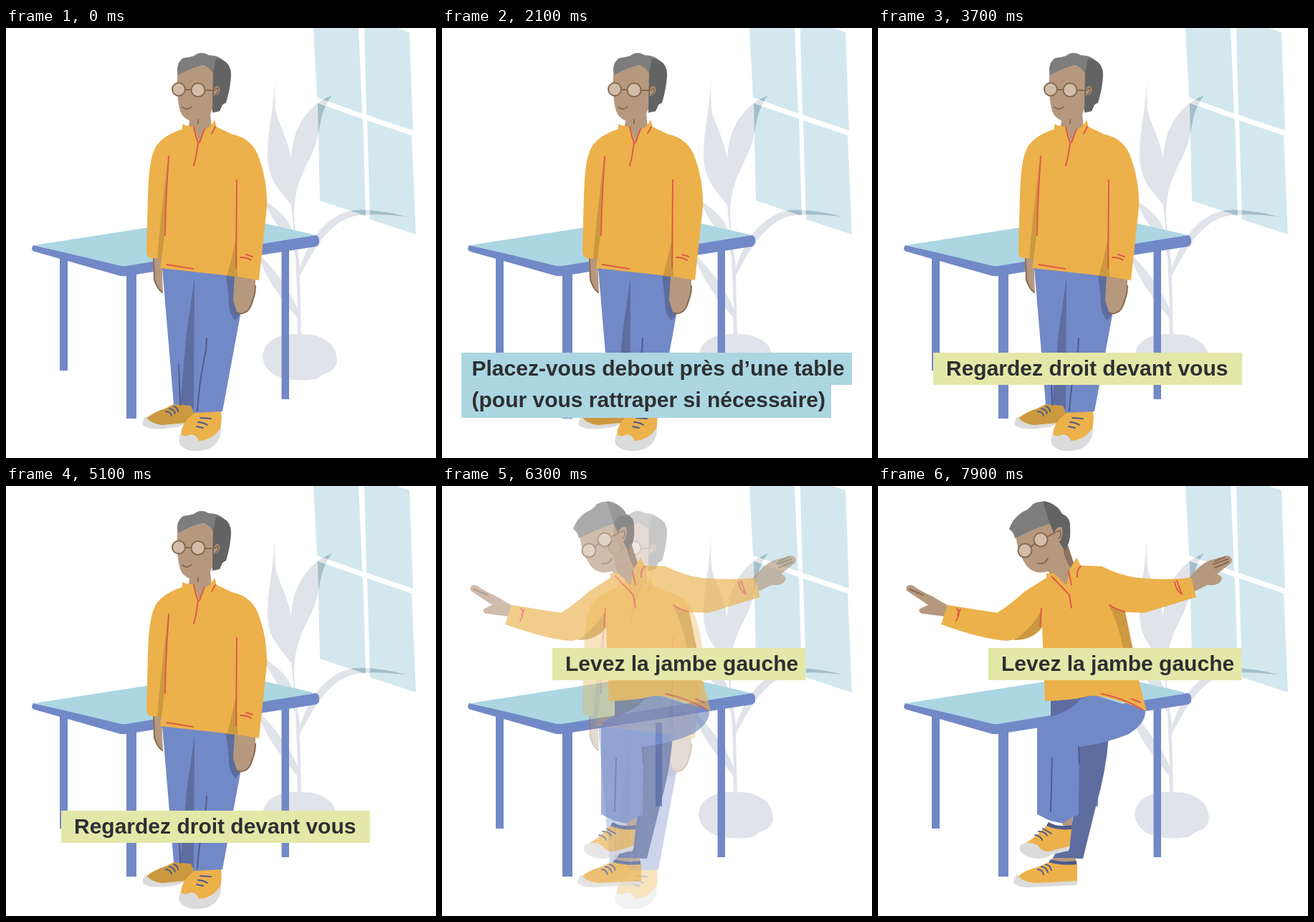
Write an HTML page that moves like this. It is 600 by 600 pixels and loops after 8 s.

```html
<!DOCTYPE html>
<html lang="fr">
<head>
<meta charset="utf-8">
<style>
html, body { margin: 0; width: 100%; height: 100%; overflow: hidden; background: #fff; }
svg { display: block; width: 100vw; height: 100vh; }
text { font: bold 30px "Liberation Sans", Arial, sans-serif; fill: #2d2f31; }
.blue { fill: #7289c7; }
.navy { fill: #5d6d9f; }
.gold { fill: #ecb14b; }
.ochre { fill: #cb993f; }
.skin { fill: #b6987e; }
.hair { fill: #7d7d7d; }
.dark { fill: #636363; }
.sole { fill: #dbdbdb; }
.lens { fill: #d2bda9; stroke: #866a50; stroke-width: 2; }
.red, .ink, .brown { fill: none; stroke-width: 1.9; stroke-linecap: round; stroke-linejoin: round; }
.red { stroke: #e0574a; }
.ink { stroke: #4b5a8f; }
.brown { stroke: #866a50; }
</style>
</head>
<body>
<svg viewBox="0 0 600 600">
<defs>
  <path id="panes" d="M429 0H492L497 119 434 97ZM500 0H545L563 6 568 143 503 121ZM435 105 498 127 502 262 438 241ZM504 129 566 150 572 288 508 267Z"/>
  <clipPath id="glass"><use href="#panes"/></clipPath>
  <path id="leaves" d="M375 72C376 95 374 110 378 122C386 145 395 160 398 184C398 150 414 110 455 94C436 118 440 142 430 168C420 194 402 215 402 262C404 300 409 320 410 335C424 290 456 250 500 254Q530 255 558 263C530 260 505 259 488 262C450 270 428 312 410 346L412 430H407L406 404C388 382 362 352 350 312C375 338 395 362 407 392L404 318C396 290 375 280 360 240C380 254 395 265 402 290L398 247C384 228 366 214 365 180C365 140 374 115 375 72Z"/>
</defs>

<g id="room">
  <use href="#panes" fill="#d2e8ee"/>
  <use href="#leaves" fill="#e0e3e9"/>
  <use href="#leaves" fill="#a2bfca" clip-path="url(#glass)"/>
  <path fill="#e0e3e9" d="M358 458Q360 441 374 434Q388 426 406 427Q432 426 441 433Q461 441 462 464Q461 478 443 483Q434 491 424 491Q400 493 382 487Q360 479 358 458Z"/>
  <path class="blue" d="M75 318H86V478H75ZM168 338H182V545H168ZM384.500 308H395V518H384.500ZM298 330H307V447H298Z"/>
  <path class="blue" d="M38 303 162 331 432 289Q437 290 437 296V300Q436 304 432 305L168 346Q162 347 156 345L40 312Q36 311 36 307Z"/>
  <path fill="#abd6e2" d="M40 303 311 261 432 289 168 332Q162 333 156 331Z"/>
</g>

<g id="standing">
  <path class="skin" d="M205 320H217L219 370Q210 363 206 352Z"/>
  <path class="brown" d="M206 322 207 350Q210 363 218 369"/>
  <path class="ochre" d="M194 546Q205 536 222 531L236 524 264 528V543L247 553 215 556Z"/>
  <path class="sole" d="M195 542Q201 552 218 554L249 551Q244 557 230 558Q205 562 193 556Q187 552 195 542Z"/>
  <path class="ink" d="M223 535Q229 535 231 541M228 531Q234 532 236 538M234 528Q239 529 240 535"/>
  <path class="gold" d="M266 535H300Q302 550 298 566L272 578 244 568Q244 550 266 535Z"/>
  <path class="sole" d="M243 567Q252 572 257 567Q266 567 269 576Q289 575 300 557Q301 572 291 582Q279 592 261 590Q243 588 241 576Z"/>
  <path class="ink" d="M271 544 286 545M268 550Q275 550 281 554M266 556 275 558"/>
  <path class="blue" d="M218 335 328 345V395L302 535 262 537 258 527 234 525Z"/>
  <path class="navy" d="M263 348Q257 390 252 425L243 526 258 527 262 534ZM307 344H320L322 390 326 401 320 408Q310 398 311 380Z"/>
  <path class="ink" d="M241 469 243 526M280 433 279 450Q270 490 267 534"/>
  <path class="skin" d="M319 345 348 350V366Q345 390 336 396Q327 400 322 396L317 380Z"/>
  <path class="brown" d="M348 360Q348 372 344 380Q341 394 333 397Q327 400 323 397"/>
  <path class="skin" d="M240 58Q236 90 243 116Q247 126 256 129L254 142 270 164 287 138 285 120 297 92 290 50Z"/>
  <path class="hair" d="M240 66Q236 50 247 42Q255 41 262 39Q272 31 283 38Q296 38 303 45Q313 50 314 65Q313 84 307 104L302 107 298 116 288 118 289 64Q286 56 276 52Q258 55 240 66Z"/>
  <path class="dark" d="M293 42 303 45Q314 51 314 65Q313 84 307 104L302 107 298 116 288 118 289 64Z"/>
  <path class="skin" d="M290 86Q294 78 298 83Q300 92 290 95Z"/>
  <circle class="lens" cx="241" cy="85.500" r="9"/><circle class="lens" cx="268" cy="86.500" r="9.500"/>
  <path class="brown" d="M250 86H258M278 87H291L296 83Q297 90 292 93M246 110Q251 116 259 110M268 128V133"/>
  <path class="gold" d="M246 134Q254 138 262 137L270 160 277 142Q287 138 291 128L294 138 315 148Q345 154 354 184Q365 215 364 250L353 352 324 347 215 335 217 322 201 321Q196 320 196 310L198 235Q199 190 206 172Q213 152 246 141Z"/>
  <path class="ochre" d="M226 181Q215 270 211 322H217L221 289ZM322 285Q315 325 308 346L323 347Z"/>
  <path class="red" d="M227 179Q223 235 222 289M322 212 321 335M262 138Q264 150 268 160L265 180 262 192M277 141 270 160M292 138 287 147M224 330 261 336M327 320Q336 320 342 324M335 316 344 319"/>
</g>

<g id="balancing">
  <path class="skin" d="M98 167 76 154Q58 146 49 139Q38 136 40 146L70 166 59 171Q55 175 61 178L93 182ZM433 129Q449 110 462 104L487 97Q496 99 493 107L473 123Q482 126 479 132Q474 140 460 138L440 148Z"/>
  <path class="brown" d="M44 144 63 152M468 109 488 102M470 105 484 99M470 114 489 106"/>
  <path class="navy" d="M241 292H300V328L241 324ZM280 350H322Q318 400 304 447L286 520 244 519 271 470Z"/>
  <path class="skin" d="M258 459H271V478H258ZM243 519H276V527H243Z"/>
  <path class="blue" d="M222 340Q222 327 240 322Q270 314 282 298L300 291 373 314Q374 331 350 346Q322 358 281 364L280 459Q270 461 258 471L240 467 222 458Z"/>
  <path class="ink" d="M243 380 241 454M280 364 281 388"/>
  <path class="gold" d="M203 500Q218 492 235 474L270 479 267 507 238 514Z"/>
  <path class="sole" d="M200 500Q218 494 226 505Q232 512 243 509L268 502 266 509 243 514Q235 520 222 520Q206 519 199 510Q196 503 200 500Z"/>
  <path class="gold" d="M194 546Q204 536 222 532L239 525 278 527V553L210 555Z"/>
  <path class="sole" d="M194 542Q200 552 220 554L279 551 277 557 210 560Q193 560 189 553Q190 546 194 542Z"/>
  <path fill="#4b5a8f" d="M238 469Q252 477 271 473L270 479Q250 481 235 474ZM241 521Q258 526 277 523V528Q256 530 238 525Z"/>
  <path class="ink" d="M219 487Q227 488 229 494M224 482Q233 482 236 488M230 478 242 485M223 535Q229 535 231 542M228 531Q235 532 237 539M234 528Q240 529 242 536"/>
  <path class="skin" d="M192 69Q195 93 207 111Q218 125 238 119L242 130 268 145 273 107 263 76 254 45 215 45Z"/>
  <path fill="#8b735f" d="M258 82 263 78 273 108 270 116Q259 103 258 82Z"/>
  <path class="hair" d="M183 60Q188 45 202 36Q212 32 216 25Q228 19 240 24Q252 28 257 39Q269 44 268 58Q269 72 265 82L261 91 248 62 242 52Q224 57 206 66L191 73Q190 65 183 60Z"/>
  <path class="dark" d="M230 21Q246 22 257 39Q269 44 268 58Q269 72 265 82L261 91 245 65 238 48Z"/>
  <path class="skin" d="M246 65Q249 56 256 57Q260 65 254 77L247 78Z"/>
  <circle class="lens" cx="205" cy="90" r="9.500"/><circle class="lens" cx="227" cy="75" r="9.500"/>
  <path class="brown" d="M213 85 219 80M236 71 247 65 254 62Q257 70 252 73M223 108Q233 110 237 101"/>
  <path class="gold" d="M97 166 166 177Q183 167 205 147L235 128V122L246 122 263 139 268 115 277 100 283 111 312 112Q338 125 362 128Q400 132 437 128L444 155 372 177 344 176 356 230Q365 280 375 314Q320 291 294 293Q275 299 233 300L229 196Q218 211 180 216Q146 214 88 193Z"/>
  <path class="ochre" d="M228 173Q217 196 190 215Q216 215 229 197ZM322 165 345 176 358 239 342 226Q336 195 322 165Z"/>
  <path class="red" d="M110 171Q116 176 109 188M115 172 111 180M228 171 226 196M414 134Q415 145 424 151L417 132M323 166Q332 173 344 175M283 112Q277 117 278 127M266 119 270 138M242 126 267 152 270 170M312 290Q345 297 369 312M354 297 366 302"/>
</g>

<g id="first">
  <path fill="#abd6e2" d="M27 453H572V498H543V544H27Z"/>
  <text x="41.500" y="485">Placez-vous debout près d’une table</text>
  <text x="41.500" y="528.500" id="line2"></text>
</g>
<g id="second">
  <path fill="#e3e8a8" d="M77 453H508V498H77Z"/>
  <text x="95" y="484.500">Regardez droit devant vous</text>
</g>
<g id="third">
  <path fill="#e3e8a8" d="M154 226H507.500V271H154Z"/>
  <text x="172" y="257.500">Levez la jambe gauche</text>
</g>
</svg>
<script>
const el = id => document.getElementById(id);
const show = (id, on) => el(id).style.display = on ? '' : 'none';

function draw(t) {
  // The two poses dissolve into each other over the fixed room.
  const fade = Math.min(1, Math.max(0, (t - 6010) / 450));
  el('standing').style.opacity = 1 - fade;
  el('balancing').style.opacity = fade;
  show('first', t >= 700 && t < 3500);
  show('second', t >= 3500 && t < 6200);
  show('third', t >= 6200);
  el('line2').textContent = `(pour vous ${t < 2000 ? 'ratraper' : 'rattraper'} si nécessaire)`;
}

const start = performance.now();
function tick() {
  draw((performance.now() - start) % 8000);
  requestAnimationFrame(tick);
}
tick();
</script>
</body>
</html>
```
